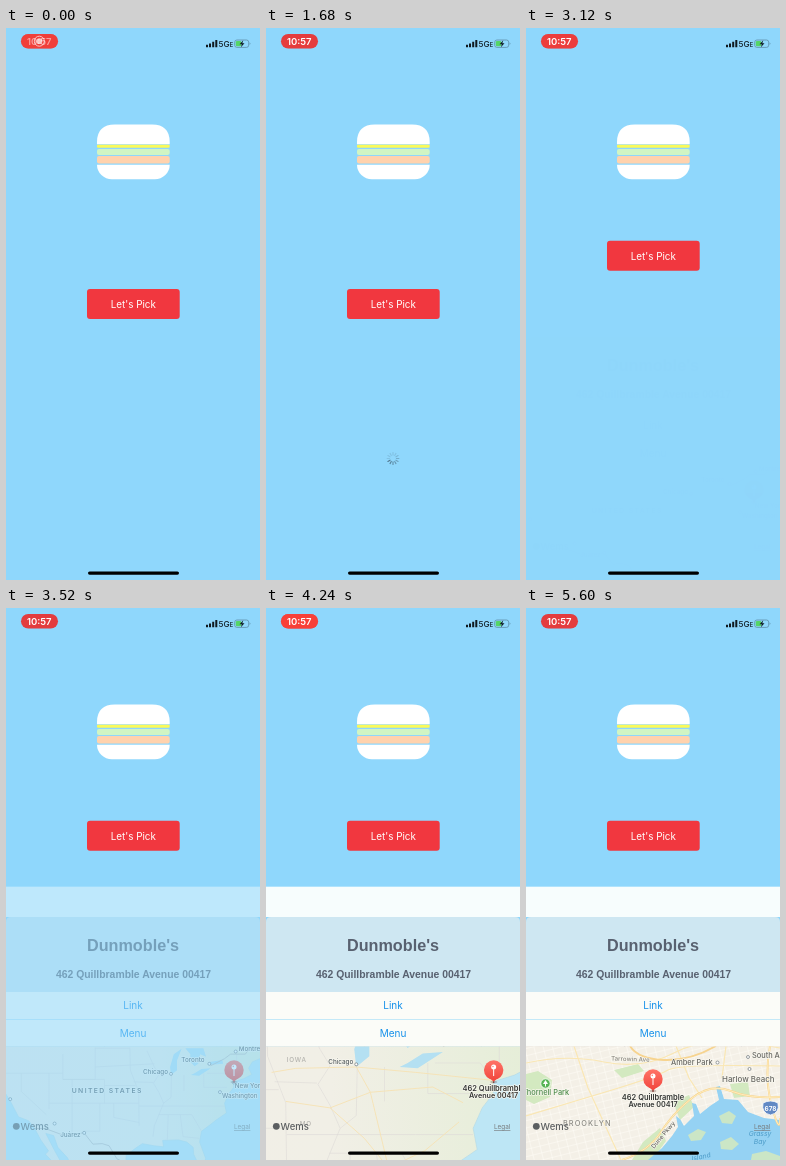
An HTML page for the animation above (5.68 s loop, 254 by 552 pixels).

```html
<!DOCTYPE html>
<html lang="en">
<head>
<meta charset="utf-8">
<title>Burger picker</title>
<style>
  html, body { margin: 0; width: 100%; height: 100%; overflow: hidden; background: #8fd7fc; }
  svg { position: fixed; left: 0; top: 0; width: 100%; height: 100%; display: block; }
  text { font-family: Inter, Roboto, sans-serif; }
  .mid { text-anchor: middle; }
  .bold { font-family: "Liberation Sans", Arial, sans-serif; font-weight: 700; fill: #586170; }
  .link { font-size: 10px; fill: #1691ea; }
  .city, .area { font-size: 6.3px; font-weight: 500; fill: #555d60; }
  .halo { paint-order: stroke; stroke: #f8f7ef; stroke-width: 1.4px; stroke-linejoin: round; }
  .thin * { vector-effect: non-scaling-stroke; }
</style>
</head>
<body>
<svg viewBox="0 0 254 552" xmlns="http://www.w3.org/2000/svg">
  <defs>
    <clipPath id="mapClip"><rect y="438.500" width="254" height="114"/></clipPath>
    <linearGradient id="land" x2="1">
      <stop offset="0" stop-color="#f1eee7"/>
      <stop offset=".55" stop-color="#f1efe6"/>
      <stop offset="1" stop-color="#dfedd0"/>
    </linearGradient>
    <linearGradient id="red" x2="0" y2="1">
      <stop offset="0" stop-color="#ff7468"/>
      <stop offset="1" stop-color="#f2483f"/>
    </linearGradient>
    <pattern id="grid" width="20" height="20" patternUnits="userSpaceOnUse" x="18" y="438">
      <rect width="20" height="20" fill="#f1ece5"/>
      <path d="M4 0V20M8 0V20M12 0V20M16 0V20M0 4H20M0 8H20M0 12H20M0 16H20" stroke="#e4ded6" stroke-width=".8"/>
      <path d="M0 0V20M0 0H20" stroke="#d3ccc4" stroke-width="1.200"/>
    </pattern>
    <pattern id="streets" width="9" height="7" patternUnits="userSpaceOnUse" patternTransform="rotate(-14)">
      <path d="M0 0H9M0 0V7" stroke="#fffdf8" stroke-width="1"/>
    </pattern>
  </defs>

  <rect width="254" height="552" fill="#8fd7fc"/>

  <!-- burger -->
  <path d="M91 116.300V114Q91 96.500 109 96.500H146Q163.700 96.500 163.700 114V116.300Z" fill="#fff"/>
  <rect x="91" y="116.800" width="72.700" height="3" rx="1" fill="#fafa58"/>
  <rect x="91" y="121" width="72.700" height="6" rx="2" fill="#d0f5c4"/>
  <rect x="91" y="128" width="72.700" height="7.400" rx="2" fill="#ffd2ad"/>
  <path d="M91 136.700H163.700A15 14.500 0 0 1 148.700 151.200H106A15 14.500 0 0 1 91 136.700Z" fill="#fff"/>

  <g id="button">
    <rect x="81" y="261" width="92.700" height="30" rx="3" fill="#f1373f"/>
    <text class="mid" x="127.300" y="280" font-size="9.900" fill="#fff">Let's Pick</text>
  </g>

  <g id="spinner" stroke-width="1.100" stroke-linecap="round"></g>

  <g id="sheet">
    <rect y="278.700" width="254" height="30.300" fill="#f7fdfd"/>
    <path d="M0 384V314Q0 309 5 309H249Q254 309 254 314V384Z" fill="#cee7f2"/>
    <rect y="384" width="254" height="55" fill="#fbfcf8"/>
    <text class="bold mid" x="127" y="342.500" font-size="16.200">Dunmoble's</text>
    <text class="bold mid" x="127.500" y="369.800" font-size="10.400">462 Quillbramble Avenue 00417</text>
    <path d="M0 411.500H254" stroke="#c4e9f8"/>
    <text class="link mid" x="127" y="401.300">Link</text>
    <text class="link mid" x="127" y="428.800">Menu</text>

    <g clip-path="url(#mapClip)">
      <rect y="438" width="254" height="114" fill="url(#grid)"/>
      <path d="M98.500 438V552M215.500 438V552" stroke="#bfc7d2" stroke-width=".9"/>
      <g id="country">
        <rect y="438" width="254" height="114" fill="#bde6f5"/>
        <g id="shapes" class="thin"></g>
        <g id="labels"></g>
      </g>

      <g id="local">
        <rect y="438" width="254" height="114" fill="#f4f0e7"/>
        <rect y="438" width="254" height="114" fill="url(#streets)"/>
        <path d="M0 466L12 463 26 472 24 489 8 496 0 492ZM88 462L112 456 118 463 96 470ZM147 494L163 487 168 499 154 512ZM117 534L134 520 140 533 126 552H106ZM204 476L222 474 224 488 208 490Z" fill="#d3e9c0"/>
        <path d="M122 552L136 540 146 528 152 519 150 508 154 511 158 518 168 508 166 495 170 496 174 506 184 498 193 492 190 479 194 478 198 491 212 492 222 504 238 510 254 512V552Z" fill="#95d2f3"/>
        <path d="M162 527L172 521 180 524 175 532 165 533ZM193 508L203 503 210 508 206 516 196 515ZM194 534L205 529 213 536 206 542 195 541ZM226 546L240 543 254 548V552H225Z" fill="#cbe6c6"/>
        <path d="M0 455Q40 446 78 454T150 444 254 440M0 508Q40 496 86 482T142 462 254 458M48 438L62 480 95 552M150 438L163 470 176 490M200 438L196 470" fill="none" stroke="#fae7b4" stroke-width="1.200"/>
        <path d="M96 552Q123 543 135 524T166 490 205 483 254 489M244 438Q238 470 246 499T254 510M104 438Q112 451 138 452T190 438" fill="none" stroke="#f7d490" stroke-width="1.900"/>
        <path d="M96 552Q123 543 135 524T166 490 205 483 254 489M244 438Q238 470 246 499T254 510" fill="none" stroke="#ffedbd" stroke-width="1"/>
        <g fill="#fff" stroke="#7d8488" stroke-width=".8">
          <circle cx="191.500" cy="454.500" r="1.500"/>
          <circle cx="222" cy="449" r="1.500"/>
          <circle cx="223.500" cy="461" r="1.500"/>
        </g>
        <g class="halo" font-size="7.400" font-weight="500" fill="#686762">
          <text x="85" y="452.500" font-size="6.200" fill="#88847c" transform="rotate(2 85 452)">Tarrowin Ave</text>
          <text x="145" y="457">Amber Park</text>
          <text x="226" y="449.800">South Amber</text>
          <text x="196" y="473.800" font-size="7.900">Harlow Beach</text>
          <text x="-4" y="486.800" fill="#4d8b4a">Thornell Park</text>
          <text x="37" y="517.500" letter-spacing="1" fill="#8b8983">BROOKLYN</text>
          <text x="128" y="541" font-size="6.200" transform="rotate(-50 128 541)">Dune Pkwy</text>
        </g>
        <g font-size="6.800" font-style="italic" fill="#4b9bc8">
          <text class="mid" x="234" y="528">Grassy</text>
          <text class="mid" x="234" y="536">Bay</text>
          <text x="166" y="553" transform="rotate(-12 166 553)">Island</text>
        </g>
        <circle cx="19.500" cy="475.500" r="4.700" fill="#57b455" stroke="#fff" stroke-width=".8"/>
        <path d="M19.500 472L22 476H17ZM19 476H20V478.500H19Z" fill="#fff"/>
        <path d="M237 495Q244.500 491 252 495Q254 505 244.500 507Q235 505 237 495Z" fill="#6289c4" stroke="#fff" stroke-width=".8"/>
        <text class="mid" x="244.500" y="502.700" font-size="6.500" font-weight="700" fill="#fff">678</text>
      </g>

      <g id="pin">
        <ellipse rx="3.500" ry="1.200" fill="#6d4c43" opacity=".3"/>
        <path d="M-3.500 -3.500L0 -.3 3.500 -3.500Z" fill="#f2483f"/>
        <circle cy="-12" r="9.700" fill="url(#red)"/>
        <path d="M0 -13V-6" stroke="#fff" stroke-width="1"/>
        <circle cy="-15" r="2.500" fill="#fff"/>
        <circle cx="-.7" cy="-15.600" r=".8" fill="#ff8b80"/>
        <circle r=".9" fill="#823d36"/>
        <g id="pinText" class="mid halo" font-size="7.500" font-weight="600" fill="#343634">
          <text y="8.800">462 Quillbramble</text>
          <text y="16.400" font-size="7.200">Avenue 00417</text>
        </g>
      </g>

      <circle cx="10.300" cy="518.300" r="3.400" fill="#5b5e60"/>
      <text x="14.600" y="521.800" font-size="9.500" font-weight="500" fill="#5b5e60">Wems</text>
      <text x="228" y="521.200" font-size="6.400" fill="#777b7d" text-decoration="underline">Legal</text>
    </g>
  </g>

  <!-- status bar -->
  <rect x="15" y="6" width="37" height="14.500" rx="7.250" fill="#e33c3e"/>
  <rect id="glow" x="15" y="6" width="37" height="14.500" rx="7.250" fill="#fd4237"/>
  <text id="clock" class="mid" x="33.300" y="16.700" font-size="9.500" font-weight="600" fill="#fff">10:57</text>
  <g id="rec">
    <circle cx="33.300" cy="13.200" r="5" fill="none" stroke="#fff"/>
    <circle cx="33.300" cy="13.200" r="2.900" fill="#fff"/>
  </g>
  <path d="M200 19.300V16.700H202V19.300ZM203 19.300V15.400H205V19.300ZM206.200 19.300V13.800H208.200V19.300ZM209.300 19.300V12H211.300V19.300Z" fill="#101a20"/>
  <text x="212.600" y="19.200" font-size="8.200" font-weight="500" fill="#14222a">5G</text>
  <text x="223.800" y="19.200" font-size="5.600" font-weight="600" fill="#14222a">E</text>
  <rect x="228.700" y="12" width="14" height="7.400" rx="2.200" fill="none" stroke="#5f8ea6" stroke-width=".8"/>
  <rect x="229.800" y="13.100" width="5.500" height="5.200" rx="1.200" fill="#55d568"/>
  <path d="M243.700 14.300Q245.300 15.700 243.700 17.100Z" fill="#5f8ea6"/>
  <path d="M237.300 12.300L233.500 16.200H235.800L234.900 19.300 238.500 15.200H236.300Z" fill="#101a20"/>
  <rect x="82" y="543.500" width="91" height="3.200" rx="1.600" fill="#000"/>
</svg>

<script>
const LOOP = 5680, ZOOM = 350, PIN = [228, 474], REST = [127, 483];
const el = id => document.getElementById(id);
const clamp = v => Math.max(0, Math.min(1, v));
const ramp = (t, start, span) => clamp((t - start) / span);
const ease = u => u < .5 ? 2 * u * u : 1 - 2 * (1 - u) ** 2;

// Mercator, in pixels of the wide view
function project(lon, lat) {
  const north = Math.log(Math.tan(Math.PI / 4 + lat * Math.PI / 360)) * 180 / Math.PI;
  return [165 + (lon + 87.6) * 4.62, 466 - (north - 46.2) * 4.62];
}
function path(points) {
  return 'M' + points.trim().split(/\s+/)
    .map(p => project(...p.split(',').map(Number)).map(v => v.toFixed(2)).join(' ')).join('L');
}

const coast = `-127,50 -124.2,41 -123.7,39 -122.4,37.4 -120.6,34.6 -118.4,33.9 -117.1,32.5
  -115.8,30.4 -114.1,28.3 -114.8,27.7 -113,26 -111.3,26 -112.8,28.4 -114.7,31.6 -113,31.2
  -112.1,29 -110,27 -109,25 -97.4,25 -97.3,27.5 -95,29 -93.8,29.7 -91.3,29.3 -89.2,29.1
  -89.4,30.3 -86,30.4 -84.2,30 -82.8,29 -82.7,27.7 -81.8,26 -80.5,25.2 -80.1,26.9
  -81.4,30 -81,32 -79.1,33.2 -77.9,34 -75.6,35.3 -76,37 -75.1,38.6 -74,39.7 -74,40.6
  -71.9,41.1 -70.1,41.8 -70.8,42.8 -70,43.8 -67,44.7 -64,45 -60,46 -60,50`;
const lakes = [
  '-87.6,41.7 -87.8,43 -87,45 -85.3,45.8 -86.3,44 -86.3,42.5',
  '-84.5,45.9 -83.4,45 -83.5,43.9 -82.5,43.1 -81.7,43.5 -81.3,45 -80,44.6 -80.6,45.9',
  '-83.3,41.7 -81.5,41.6 -79,42.8 -81,42.7 -82.5,42',
  '-79.7,43.3 -76.3,43.5 -76.5,44.1 -79.3,43.8'
];
const states = [
  '-124,42 -111,42', '-111,41 -102,41', '-114,37 -94.6,37', '-102,40 -95.3,40', '-104,43 -91.2,43.5',
  '-104,45.9 -96.5,45.9', '-120,42 -120,39 -114.6,35', '-114,42 -114,36', '-109,41 -109,31.3',
  '-104,46 -104,41', '-102,41 -102,37', '-111,45 -111,41 -104,41', '-103,37 -103,32 -106.5,32',
  '-100,37 -100,34.5 -94.5,33.6', '-96.5,46 -96.4,42.5 -94.6,39 -94.5,33', '-95.7,40.6 -91.5,40.5',
  '-92.8,45.5 -91.2,43 -90.2,41.8 -91.4,40.4 -90.2,38.8 -89.2,37 -91.2,33 -91.5,31',
  '-87.5,41.7 -87.6,38 -89.2,37', '-84.8,41.7 -84.8,39.1', '-94.5,36.5 -81.7,36.5 -76,36.5', '-90.3,35 -83.1,35',
  '-88.2,35 -88.4,30.4', '-85.6,35 -85,31 -81.5,30.7', '-83.1,35 -81,32', '-80.5,42 -80.5,39.7 -75.5,39.7',
  '-79.8,42 -75.3,42 -74.7,41.4', '-73.4,45 -73.4,41.1'
];
const borders = [
  '-117,32.5 -114.8,32.5 -111,31.3 -108.2,31.3 -106.5,31.8 -104.5,29.6 -102.5,29.7 -101,29.3 -99.3,26.8 -97.2,25.9',
  '-79,43.2 -76,44.3 -74.7,45 -71.5,45 -70.5,46'
];
const roads = [
  '-96,41.3 -93.6,41.6 -87.6,41.7 -81.7,41.3 -74,40.7', '-94.6,39.1 -90.2,38.6 -86.2,39.8 -80,40.2 -77,39',
  '-87.6,41.7 -86.2,39.8 -84.4,33.8', '-77.4,37.5 -80.8,35.2 -84.4,33.8', '-90.2,38.6 -86.8,36.2 -84.4,33.8'
];
const line = (points, color, width) =>
  `<path d="${path(points)}" fill="none" stroke="${color}" stroke-width="${width}"/>`;
el('shapes').innerHTML =
  `<path d="${path(coast)}Z" fill="url(#land)" stroke="#b4d9e4" stroke-width=".6"/>` +
  lakes.map(p => `<path d="${path(p)}Z" fill="#b4e0f2"/>`).join('') +
  states.map(p => line(p, '#dedbd7', .6)).join('') +
  `<g id="roads">${roads.map(p => line(p, '#f6e3b4', .9)).join('')}</g>` +
  borders.map(p => line(p, '#bcb6b4', .8)).join('');

const labels = [];
// show: 1 only near, -1 only far, 0 always
function addLabel(lon, lat, show, html) {
  const node = document.createElementNS('http://www.w3.org/2000/svg', 'g');
  node.innerHTML = html;
  el('labels').append(node);
  labels.push({ node, at: project(lon, lat), show });
}
// name, lon, lat, label offset, show
[
  ['Chicago', -87.6, 41.9, -28, 0, 0], ['Toronto', -79.3, 43.5, -28, -1.5, -1],
  ['Montréal', -73.6, 45.4, 3, -.5, -1], ['New York', -74, 40.5, 1, 6, -1],
  ['Washington', -77, 38.9, 2, 6, -1], ['Juárez', -106.4, 31.7, -24, 4, -1],
  ['', -122.4, 37.7, 0, 0, -1], ['', -112.8, 33.4, 0, 0, -1]
].forEach(([name, lon, lat, dx, dy, show]) => addLabel(lon, lat, show,
  `<circle r="1.500" fill="#fff" stroke="#7d8488" stroke-width=".8"/><text class="city halo" x="${dx}" y="${dy}">${name}</text>`));
[['IOWA', -93.5, 42.1], ['MO', -92.6, 37.2]].forEach(([name, lon, lat]) => addLabel(lon, lat, 1,
  `<text class="area mid" letter-spacing=".8" style="fill:#b4b3ae">${name}</text>`));
addLabel(-101.4, 38.8, -1,
  '<text class="area mid halo" letter-spacing="1.400" style="font-size:6.8px;font-weight:600">UNITED STATES</text>');

const SPOKES = 12;
el('spinner').innerHTML = Array.from({ length: SPOKES }, (_, i) =>
  `<path d="M0 -3.400V-5.900" transform="translate(127 430.500) rotate(${i * 360 / SPOKES})" stroke="#51788f"/>`).join('');
const spokes = [...el('spinner').children];

const fade = (id, v) => el(id).setAttribute('opacity', clamp(v));
const move = (node, x, y, more = '') => node.setAttribute('transform', `translate(${x} ${y}) ${more}`);

function draw(t) {
  fade('clock', .5 + t / 400);
  fade('rec', .7 - t / 340);
  fade('glow', .5 + .5 * Math.cos((t - 4500) / 1000 * Math.PI));

  const loading = t >= 880 && t < 2960;
  fade('spinner', loading ? 1 : 0);
  const head = Math.floor(t / 1000 * SPOKES);
  spokes.forEach((s, i) => {
    const age = (((head - i) % SPOKES) + SPOKES) % SPOKES;
    s.setAttribute('opacity', Math.max(.22, 1 - age / 9));
  });
  move(el('button'), 0, t < 2960 ? 0 : -48.3);
  fade('sheet', ease(ramp(t, 3080, 920)));

  // the visible region shrinks and shifts linearly with p
  const p = ease(ramp(t, 3980, 500));
  const scale = 1 / (1 - p + p / ZOOM);
  const away = (1 - p) * scale;
  const x = REST[0] + (PIN[0] - REST[0]) * away;
  const y = REST[1] + (PIN[1] - REST[1]) * away;
  move(el('pin'), x, y);
  fade('pinText', ramp(t, 4000, 160));

  const depth = Math.log(scale);
  el('country').style.display = scale > 20 ? 'none' : '';
  if (scale <= 20) {
    const near = clamp((depth - .2) * 2.5);
    fade('country', 1 - (depth - 1) / 1.4);
    fade('roads', near);
    move(el('shapes'), x, y, `scale(${scale}) translate(${-PIN[0]} ${-PIN[1]})`);
    labels.forEach(({ node, at, show }) => {
      move(node, x + (at[0] - PIN[0]) * scale, y + (at[1] - PIN[1]) * scale);
      node.setAttribute('opacity', show > 0 ? near : show < 0 ? 1 - near : 1);
    });
  }
  fade('local', ramp(t, 5000, 280));
}

const start = performance.now();
function tick() {
  draw((performance.now() - start) % LOOP);
  requestAnimationFrame(tick);
}
tick();
</script>
</body>
</html>
```
